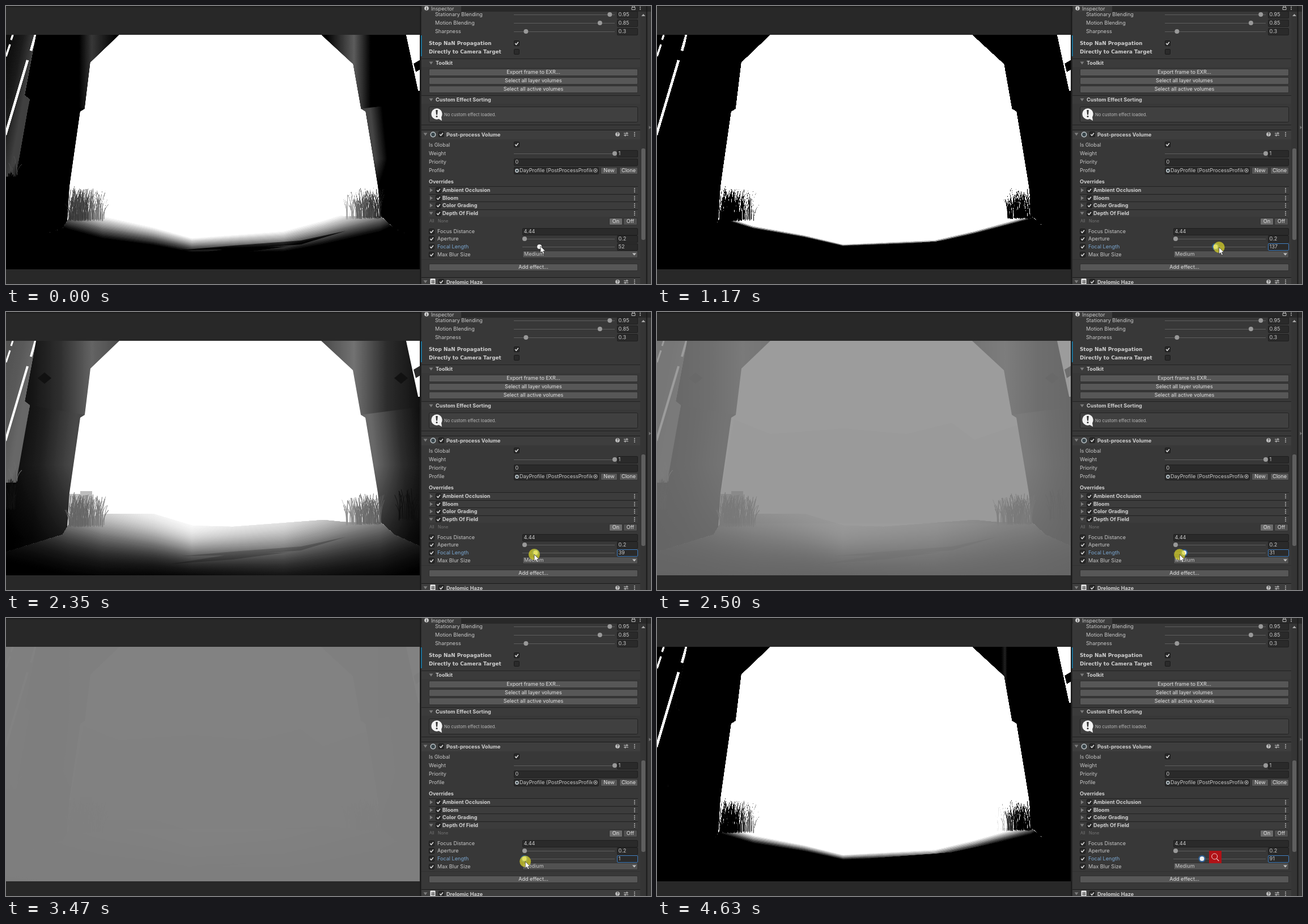
An HTML page with a canvas for the animation above (4710 ms loop, 1138x492 px).

```html
<!DOCTYPE html>
<html lang="en">
<head>
<meta charset="utf-8">
<title>Depth of field inspector</title>
<style>
  html, body { margin: 0; width: 100%; height: 100%; overflow: hidden; background: #282828; }
  canvas { position: absolute; left: 0; top: 51px; }
  svg { position: absolute; left: 0; top: 0; }
  text { font: 9.1px Inter, sans-serif; fill: #c8c8c8; white-space: pre; }
  .b { font-weight: 700; fill: #d0d0d0; }
  .wide { font: bold 8.8px "DejaVu Sans", sans-serif; fill: #d0d0d0; }
  .small { font-size: 7.7px; fill: #b8b8b8; }
  .dim { font-size: 7.2px; fill: #777; }
  .mid { text-anchor: middle; fill: #e2e2e2; }
  .blue { fill: #7ba7d0; }
  .help { font-size: 7px; font-weight: 700; fill: #3e3e3e; text-anchor: middle; }
</style>
</head>
<body>
<canvas id="scene" width="730" height="415"></canvas>
<svg id="ui" width="1138" height="492" viewBox="0 0 1138 492"></svg>
<script>
const clamp = (v, a = 0, b = 1) => Math.min(b, Math.max(a, v));
const ease = p => (1 - Math.cos(Math.PI * clamp(p))) / 2;

/* Scene: blur radius as grey around 0.5; the focal length only changes its contrast */
const canvas = document.getElementById('scene');
const ctx = canvas.getContext('2d');
const grey = v => { const n = Math.round(clamp(v) * 255); return `rgb(${n},${n},${n})`; };
const fill = (d, style) => { ctx.fillStyle = style; ctx.fill(new Path2D(d)); };
const stroke = (d, shade, width) => {
  ctx.strokeStyle = grey(shade);
  ctx.lineWidth = width;
  ctx.stroke(new Path2D(d));
};

// Evenly spaced shades along a slightly tilted horizontal axis
function ramp(x0, x1, tilt, ...shades) {
  const g = ctx.createLinearGradient(x0, 100, x1, 100 + tilt);
  shades.forEach((s, i) => g.addColorStop(i / (shades.length - 1), grey(s)));
  return g;
}

let seed = 11;
const rnd = () => (seed = (seed * 16807) % 2147483647) / 2147483647;

function grass(count, x0, x1, base, height, lean, shade) {
  for (let i = 0; i < count; i++) {
    const u = rnd(), x = x0 + u * (x1 - x0), y = base + rnd() * 5;
    const h = height * (0.45 + rnd() * 0.55), dx = (rnd() - 0.5) * 18 + lean;
    stroke(`M${x} ${y}q0 ${-h * 0.6} ${dx} ${-h}`, shade(u) + (rnd() - 0.5) * 0.03, 0.6 + rnd() * 0.6);
  }
}

// Shade falls from far to near across the focus line, more softly towards the sides
function drawGround() {
  const focus = [[0, 325], [110, 372], [170, 391], [260, 407], [328, 423], [490, 416], [560, 400], [660, 373], [731, 335]];
  ctx.save();
  ctx.clip(new Path2D('M0 425L100 394L112 374L135 366L180 357H260L330 378L400 380L480 374L560 368L600 372L662 373L685 394L731 415V467H0Z'));
  ctx.fillStyle = grey(0.95);
  ctx.fillRect(0, 340, 731, 130);
  for (let o = -65; o <= 90; o++) {
    const edge = focus.map(([x, y]) => `${x} ${y + o * (0.75 + Math.abs(x - 350) / 340)}`);
    fill(`M${edge.join('L')}V700H0Z`, grey(0.5 - 0.5 * Math.tanh(o / 42)));
  }
  fill('M310 432L400 424L520 415L600 398L520 422L420 430ZM290 446L390 430L500 425L400 438Z', 'rgba(0,0,0,.2)');
  ctx.restore();
}

function drawScene() {
  ctx.translate(0, -51);
  fill('M0 51H731V466H0Z', '#fff');

  // Far left wall with bright slits
  fill('M0 51H53L33 158L42 165L20 302H0Z', ramp(0, 42, 8, 0.34, 0.36, 0.41));
  stroke('M12 51L9 60M7 68L0 89', 1, 3);
  stroke('M52 51L44 79M38 96L-1 228', 1, 4);
  fill('M0 302H40V430H0Z', grey(0.08));

  // Hut behind the grass
  fill('M131 317H152V350H112V322H131Z', grey(0.72));

  // Left pillar
  fill('M42 165L60 150H139V182L131 187L112 320L107 397L0 428V320L18 302Z', ramp(20, 132, 12, 0.07, 0.15, 0.3));
  fill('M53 51H200L149 100L139 182L42 165L33 158Z', ramp(42, 206, 0, 0.11, 0.21, 0.4, 0.3));

  // Right pillar
  fill('M626 150V182L634 187L656 320L662 375L685 397L731 418V150Z', ramp(634, 731, -10, 0.42, 0.2, 0.07));
  fill('M556 51H706L731 168L626 182L612 103Z', ramp(556, 730, 0, 0.3, 0.45, 0.2, 0.1));
  fill('M719 102L731 95V112L723 117Z', grey(0.2));
  for (const x of [68, 697]) fill(`M${x - 12} 117l12 -10l12 10l-12 10Z`, grey(0.1));

  const fade = ctx.createLinearGradient(0, 270, 0, 400);
  fade.addColorStop(0, 'rgba(0,0,0,0)');
  fade.addColorStop(1, 'rgba(0,0,0,.6)');
  fill('M20 270H119L112 320L107 400L0 428V310ZM648 270H731V418L662 385L656 320Z', fade);

  drawGround();

  grass(8, 10, 20, 298, 36, 3, () => 0.43);
  grass(30, 0, 16, 345, 52, 0, () => 0.1);
  grass(35, 690, 731, 365, 55, 0, () => 0.1);
  grass(130, 110, 173, 376, 58, 3, u => 0.39 + 0.095 * u);
  grass(60, 110, 145, 376, 40, 0, () => 0.41);
  grass(40, 600, 622, 373, 46, -1, u => 0.56 - 0.04 * u);
  grass(130, 618, 661, 372, 52, -2, u => 0.47 - 0.1 * u);
}

/* Inspector panel */
const rect = (x, y, w, h, color, extra = '') =>
  `<rect x="${x}" y="${y}" width="${w}" height="${h}" fill="${color}" ${extra}/>`;
const text = (x, cy, s, cls = '', id = '') =>
  `<text x="${x}" y="${cy + 3.2}" class="${cls}" ${id && `id="${id}"`}>${s}</text>`;
const shape = (d, color, extra = '') => `<path d="${d}" fill="${color}" ${extra}/>`;
const pen = (d, color, width = 1.1) => shape(d, 'none', `stroke="${color}" stroke-width="${width}"`);
const dot = (x, y, r, color, extra = '') => `<circle cx="${x}" cy="${y}" r="${r}" fill="${color}" ${extra}/>`;
const ring = (x, y, r, color) => dot(x, y, r, 'none', `stroke="${color}"`);
const group = (id, ...parts) => `<g id="${id}">${parts.join('')}</g>`;
const rows = (list, y, pitch, draw) => list.map((item, i) => draw(item, Math.round(y + i * pitch), i)).join('');

const box = (x, cy, w, color, border, id = '') =>
  rect(x + 0.5, cy - 5.5, w - 1, 12, color, `stroke="${border}" rx="1.5" ${id && `id="${id}"`}`);
const field = (x, cy, s, id = '', w = 1115 - x) =>
  box(x, cy, w, '#2a2a2a', '#1f1f1f', id && id + 'Box') + text(x + 2.5, cy, s, '', id);
const button = (x, cy, w, s, color = '#575757') => box(x, cy, w, color, '#303030') + text(x + w / 2, cy, s, 'mid');
const check = (x, cy, on = true) =>
  rect(x - 4.5, cy - 4.5, 9, 9, '#2a2a2a', 'stroke="#191919" rx="1"') +
  (on ? pen(`M${x - 2.8} ${cy}l2 2.3l3.8 -4.6`, '#e0e0e0', 1.4) : '');
const down = (x, y) => shape(`M${x - 3.5} ${y - 2.5}h7l-3.5 5z`, '#7c7c7c');
const right = (x, y) => shape(`M${x - 2} ${y - 3.5}v7l5 -3.5z`, '#7c7c7c');
const dots = (x, y) => [-3, 0, 3].map(d => dot(x, y + d, 0.9, '#c4c4c4')).join('');
const bar = (x, cy) => rect(x, cy, 1074 - x, 1, '#5e5e5e');
const slider = (x, cy, share, s) => bar(x, cy) + dot(x + 4 + share * (1070 - x), cy, 4, '#999') + field(1078, cy, s);
const lens = (x, y, r) => dot(x, y, r, '#39454a', 'stroke="#bcc4c8" stroke-width="1.6"');
const band = (y, h, color) => rect(733, y, 386, h, color);
const section = (cy, s) => band(cy - 8, 1, '#222') + band(cy - 7, 14, '#3b3b3b') + down(750, cy) + text(758, cy, s, 'b');
const component = (cy, s, icon) =>
  band(cy - 8, 1, '#1a1a1a') + band(cy - 7, 16, '#3e3e3e') + down(740, cy) + icon + check(768, cy) +
  text(777, cy + 0.5, s, 'b') + dot(1079, cy, 3.8, '#c4c4c4') + text(1079, cy - 0.6, '?', 'help') +
  pen(`M1090 ${cy - 1.8}h8m-8 3.6h8m-2.5 -5.6v4m-3 -.4v4`, '#c4c4c4') + dots(1109, cy);

const header = () =>
  rect(732, 0, 406, 10, '#282828') + rect(734, 0, 69, 10, '#3c3c3c') +
  dot(742, 4, 3.8, '#d4d4d4') + pen('M742 1.4v1.2m0 .7v3.4', '#333', 1.3) + text(750, 5, 'Inspector') +
  pen('M1104 2.5h6v4h-6zM1105 2V0h4v2', '#bbb', 1) + dots(1119, 3);

const layerPart = () =>
  rows([['Stationary Blending', 0.95], ['Motion Blending', 0.85], ['Sharpness', 0.1, '0.3']], 15, 15,
    ([s, share, shown = share], y) => text(757, y, s) + slider(896, y, share, shown)) +
  rect(732, 52, 1.6, 37, '#1580b0') +
  rows(['Stop NaN Propagation', 'Directly to Camera Target'], 66, 15,
    (s, y, i) => text(746, y, s, 'wide') + check(901, y, i === 0)) +
  section(101, 'Toolkit') +
  rows(['Export frame to EXR...', 'Select all layer volumes', 'Select all active volumes'], 117, 15,
    (s, y) => button(746, y, 369, s)) +
  section(166, 'Custom Effect Sorting') +
  rect(746.5, 178.5, 368, 27, '#404040', 'stroke="#232323" rx="2"') +
  shape('M762 199L769 203L768 196z', '#f2f2f2') + dot(760, 191, 9.7, '#f2f2f2') +
  shape('M758.3 184h3.4l-.7 8.5h-2z', '#333') + dot(760, 195.6, 1.5, '#333') +
  text(773, 192, 'No custom effect loaded.', 'small') + band(210, 1, '#222');

const volumePart = () =>
  component(227, 'Post-process Volume', lens(753.5, 227.5, 4.2)) +
  rows(['Is Global', 'Weight', 'Priority', 'Profile'], 245.6, 15.1, (s, y) => text(746, y, s)) +
  check(901, 245) + slider(896, 261, 1, '1') + field(896, 276, '0') + field(896, 291, '', '', 150) +
  lens(901.5, 291.5, 2.6) +
  `<svg x="905" y="284" width="129.5" height="15">${text(1, 7, 'DayProfile (PostProcessProfile)')}</svg>` +
  ring(1040, 291, 3.2, '#bbb') + dot(1040, 291, 1.3, '#bbb') +
  button(1049, 291, 30, 'New') + button(1082, 291, 33, 'Clone') +
  text(746, 310.5, 'Overrides', 'b') +
  rows(['Ambient Occlusion', 'Bloom', 'Color Grading', 'Depth Of Field'], 326, 13.6, (s, y, i) =>
    rect(746, y - 6, 369, 12, '#3c3c3c') + rect(746, y - 7, 369, 1, '#222') +
    (i < 3 ? right : down)(750, y) + check(763, y) + text(770, y, s, 'b') + dots(1109, y)) +
  text(747, 380, 'All', 'dim') + text(762, 380, 'None', 'dim') +
  button(1064, 381, 24, 'On', '#6c6c6c') + button(1089, 381, 25, 'Off', '#505050') +
  rows(['Focus Distance', 'Aperture', 'Focal Length', 'Max Blur Size'], 398.7, 13.6, (s, y, i) =>
    check(751, y) + text(761, y, s, i === 2 ? 'blue' : '')) +
  field(911, 399, '4.44') + slider(911, 412, 0, '0.2') + bar(911, 426) + field(1078, 426, '52', 'value') +
  box(911, 439, 204, '#515151', '#303030') + text(914, 439, 'Medium') + shape('M1105 437.5h7l-3.5 4z', '#c4c4c4') +
  band(448, 1, '#303030') + button(746, 462, 369, 'Add effect...');

const fogPart = () =>
  component(488, 'Drelomic Haze', rect(748.5, 482.5, 9, 11, '#eee', 'rx="1"') +
    pen('M752 484.5v7m2.6 -7v7M750 486.8h6.6m-6.6 2.6h6.6', '#3a3a3a', 0.9));

const scrollbar = () =>
  rect(1119, 10, 11, 482, '#353535') + rect(1121, 252, 7, 162, '#5f5f5f', 'rx="3"') +
  shape('M1121 18h7l-3.5 -4z', '#aaa') + rect(1129.5, 0, 2, 492, '#1b1b1b') + shape('M1134.5 212v6l3.5 -3z', '#777');

const cursors = () =>
  group('handle', dot(0, 0, 6.3, '#2f5f94', 'id="halo"'), dot(0, 0, 4, '#f0f0f0')) +
  group('pointer', dot(0, 0, 10, 'rgb(222,216,40)', 'id="press" opacity=".7"'),
    shape('M0 0V12L2.8 9.5L4.7 14L6.8 13.1L4.9 8.8H8.6Z', '#fff', 'stroke="#222" stroke-width=".7"')) +
  group('zoom', rect(974, 412, 22, 22, '#b01217'), ring(983.7, 422, 5, '#f0d0d0'), pen('M987.3 425.8l4 4.2', '#f0d0d0'));

const hills = 'M136 190L200 216L330 206L440 216L520 196L560 226L636 200L656 320L640 374H118L113 320Z';
document.getElementById('ui').innerHTML =
  shape(hills, '#000', 'id="hills"') + rect(0, 0, 731, 2, '#1c1c1c') +
  rect(731, 0, 407, 492, '#383838') + rect(730.5, 0, 2, 492, '#191919') +
  header() + layerPart() + volumePart() + fogPart() + scrollbar() + cursors();
drawScene();

/* Motion: one eased drag path; the inspector follows it with a delay */
const LOOP = 4710, PAUSE = 150, STEP = 78.6;
const LAG = 100, RELEASE = 4180, DONE = 4440, ZOOM = 4540;
const drag = [[230, 943], [1530, 1002], [2350, 932], [2600, 918], [3100, 902], [RELEASE, 961.5], [4460, 984]];

function mouseX(t) {
  const i = clamp(drag.findIndex(k => k[0] > t), 1, drag.length - 1);
  if (t >= drag.at(-1)[0]) return drag.at(-1)[1];
  const [t0, x0] = drag[i - 1], [t1, x1] = drag[i];
  return x0 + (x1 - x0) * ease((t - t0) / (t1 - t0));
}
const mouseY = t => 425 + Math.min(7, t * 0.0017) + 38 * ease((t - RELEASE) / 200);
const sliderX = v => 914 + v * 0.522;
const focal = t => clamp((mouseX(Math.min(t, RELEASE)) - 914) / 0.522, 1, 300);
const stepTime = t => t < PAUSE ? 0 : PAUSE + STEP * Math.floor((t - PAUSE) / STEP + 0.25);

const [handle, halo, pointer, press, zoom, value, valueBox, haze] =
  ['handle', 'halo', 'pointer', 'press', 'zoom', 'value', 'valueBox', 'hills'].map(id => document.getElementById(id));
const show = (el, on) => { el.style.display = on ? '' : 'none'; };
const place = (el, x, y) => el.setAttribute('transform', `translate(${x} ${y})`);

function render(now) {
  const t = stepTime(now % LOOP);
  const gain = (focal(t) / 33) ** 2;
  const shown = t < PAUSE ? 52 : Math.max(t < 1000 ? 52 : 1, Math.round(focal(t - LAG)));
  const focused = t > 300;

  canvas.style.filter = `contrast(${gain.toFixed(4)})`;
  haze.style.opacity = 0.025 * clamp(gain / 0.07) * clamp(1 - gain * 2);
  value.textContent = shown;
  valueBox.setAttribute('stroke', focused ? '#3a79bb' : '#1f1f1f');
  place(handle, sliderX(shown), 426);
  place(pointer, mouseX(t), mouseY(t));
  show(halo, focused);
  show(press, focused && t < RELEASE + LAG);
  show(pointer, t < DONE);
  show(zoom, t >= ZOOM);
}
function loop() {
  render(performance.now());
  requestAnimationFrame(loop);
}
loop();
</script>
</body>
</html>
```
